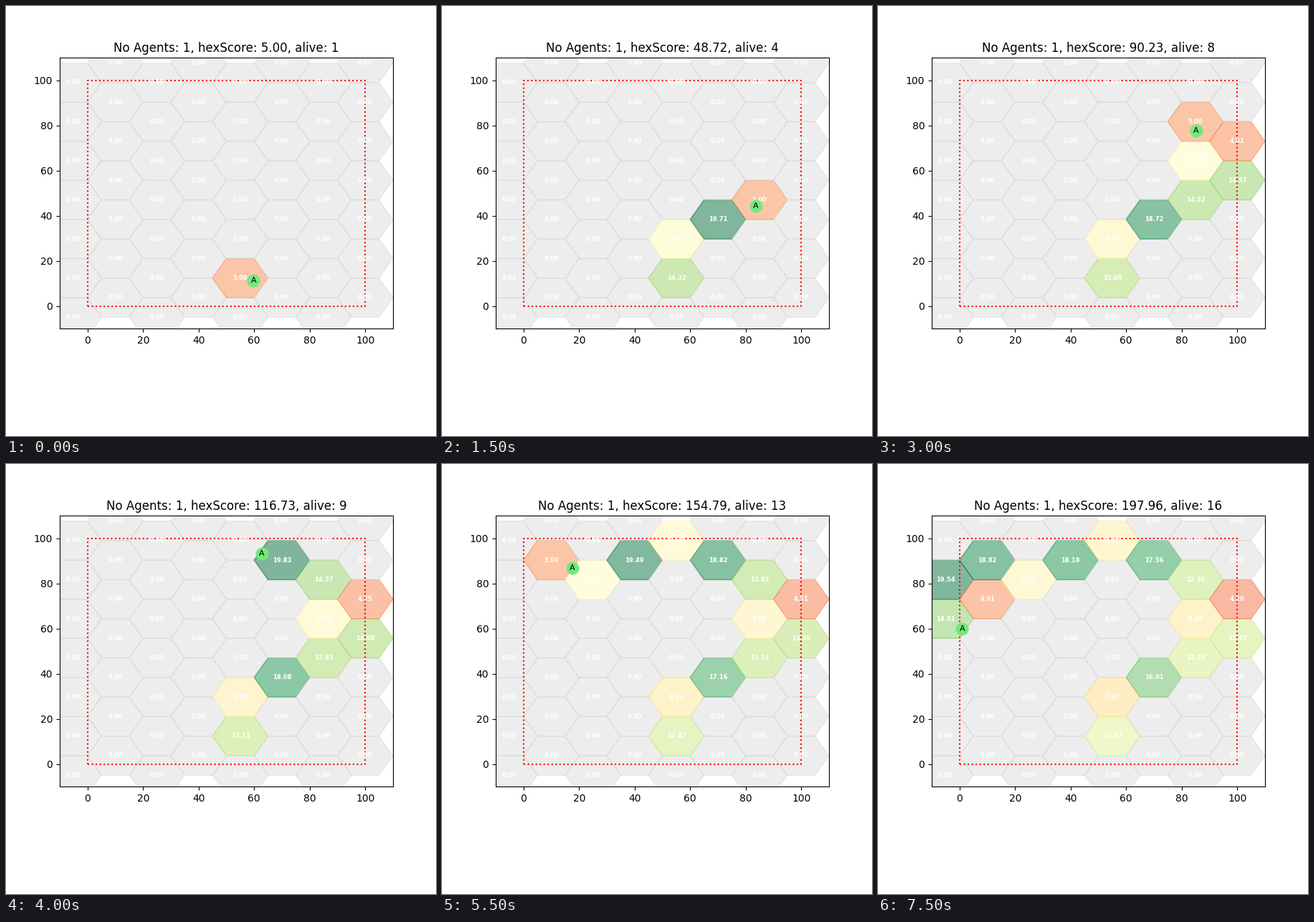
Recreate the animation shown at these times as a matplotlib script. Size 600 by 600 pixels, loop 8000 ms.

```python
import numpy as np
import matplotlib.pyplot as plt
from matplotlib.animation import FuncAnimation
from matplotlib.patches import RegularPolygon

FRAMES, INTERVAL = 16, 500
STEPS = 3                  # simulation steps per drawn frame
DECAY = 0.5 ** (1 / 120)
GAIN, CAP = 5, 20
COLS, ROWS, R = 8, 7, 10
CMAP = plt.get_cmap("RdYlGn")

# turning points of the agent's walk: step, x, y
TURNS = np.array([
    (0, 59.8, 11.2), (2, 59.8, 20.3), (5, 66, 34), (8, 78.2, 40.5),
    (9, 83.6, 44.3), (12, 93.6, 54.2), (14, 95.5, 62.5), (15, 94, 67.4),
    (17, 88, 72.2), (18, 85.1, 77.6), (20, 79.8, 86.3), (24, 62.8, 93.2),
    (27, 46.6, 92.6), (33, 17.5, 86.8), (36, 3.8, 85.5), (37, 0.3, 83.8),
    (39, 0.6, 88.9), (42, 1.6, 74), (45, 0.9, 59.8),
])

# flat-topped hexagons, odd columns shifted up by half a cell
CENTERS = np.array([
    (-5 + 1.5 * R * c, -5 + np.sqrt(3) * R * (r + c % 2 / 2))
    for c in range(COLS) for r in range(ROWS)])


def agent_at(step):
    t, x, y = TURNS.T
    return np.array([np.interp(step, t, x), np.interp(step, t, y)])


def scores_at(step):
    """Every step all scores fade and the cell under the agent gains."""
    scores = np.zeros(len(CENTERS))
    for s in range(step + 1):
        scores *= DECAY
        here = np.argmin(np.hypot(*(CENTERS - agent_at(s)).T))
        scores[here] = min(CAP, scores[here] + GAIN)
    return scores


fig = plt.figure(figsize=(6, 6), dpi=100, facecolor="white")
ax = fig.add_axes([0.125, 0.25, 0.775, 0.63])
ax.set(xlim=(-10, 110), ylim=(-10, 110))
title = ax.set_title("")

hexagons, labels = [], []
for x, y in CENTERS:
    hexagons.append(ax.add_patch(
        RegularPolygon((x, y), 6, radius=R, orientation=np.pi / 6)))
    labels.append(ax.text(x, y, "", color="white", size=6, weight="bold",
                          ha="center", va="center", clip_on=True))

ax.plot([0, 100, 100, 0, 0], [0, 0, 100, 100, 0], ":", color="red", lw=1.5)
dot, = ax.plot([], [], "o", ms=13, mew=0, color="#72ea7c", zorder=5)
name = ax.text(0, 0, "A", size=8, ha="center", va="center", zorder=6)


def update(i):
    scores = scores_at(i * STEPS)
    for hexagon, label, score in zip(hexagons, labels, scores):
        if score:
            hexagon.set(color=CMAP(score / CAP), alpha=0.5)
        else:
            hexagon.set(color="lightgrey", alpha=0.4)
        label.set_text(f"{score:.2f}")
    x, y = agent_at(i * STEPS)
    dot.set_data([x], [y])
    name.set_position((x, y))
    title.set_text(f"No Agents: 1, hexScore: {scores.sum():.2f}, "
                   f"alive: {np.count_nonzero(scores)}")
    return []


anim = FuncAnimation(fig, update, frames=FRAMES, interval=INTERVAL,
                     repeat=True, repeat_delay=0)
plt.show()
```
